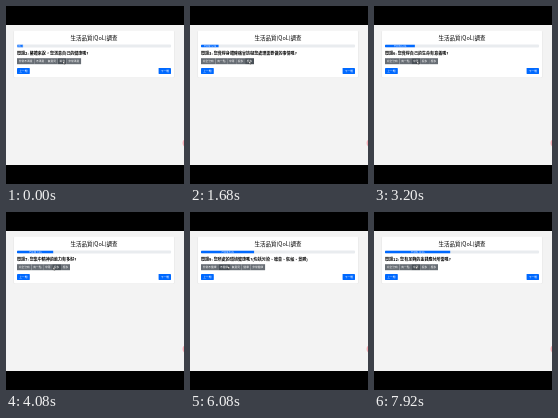
An HTML page with a canvas for the animation above (8000 ms loop, 178x178 px).

```html
<!DOCTYPE html>
<html lang="zh-Hant">
<head>
<meta charset="utf-8">
<title>生活品質調查</title>
<style>
html, body { margin: 0; width: 100%; height: 100%; overflow: hidden; background: #000; }
canvas { display: block; width: 100vw; height: 100vh; }
</style>
</head>
<body>
<canvas></canvas>
<script>
const LOOP = 8000, STAGE = 178, TOTAL = 26;
const BLUE = '#0069ff', GRAY = '#676d74', HOVER = '#495057', INK = '#000';
const FONT = '"Noto Sans CJK TC", "Noto Sans CJK", sans-serif';
const LEFT = 11, RIGHT = 165, BAR_Y = 38.6, BAR_H = 3;

const SATISFIED = ['非常不滿意', '不滿意', '無意見', '滿意', '非常滿意'];
const DEGREE = ['完全沒有', '有一點', '中等', '很多', '極多'];
const HEALTHY = ['非常不健康', '不健康', '無意見', '健康', '非常健康'];

// start time, question, answers; numbering starts at 2
const questions = [
  [-40, '整體來說，您滿意自己的健康嗎?', SATISFIED],
  [960, '您覺得身體疼痛會妨礙您處理需要做的事情嗎?', DEGREE],
  [1760, '您需要靠醫療的幫助應付日常生活嗎?', DEGREE],
  [2480, '您享受生活嗎?', DEGREE],
  [3160, '您覺得自己的生命有意義嗎?', DEGREE],
  [4000, '您集中精神的能力有多好?', DEGREE],
  [4840, '在日常生活中，您感到安全嗎?', DEGREE],
  [5520, '您所處的環境健康嗎?(包括污染、噪音、氣候、景觀)', HEALTHY],
  [6320, '您每天的生活有足夠的精力嗎?', DEGREE],
  [7120, '您能接受自己的外表嗎?', DEGREE],
  [7880, '您有足夠的金錢應付所需嗎?', DEGREE]
];

// time, x, y of the pointer
const pointerPath = [
  [0, 57, 55], [800, 57, 55], [1680, 59, 55], [2480, 42, 55], [3200, 43, 55],
  [3760, 49, 55], [4720, 42, 55], [5040, 42, 55], [6080, 38, 54], [6800, 27, 54], [8000, 42, 54]
];

const canvas = document.querySelector('canvas');
const ctx = canvas.getContext('2d');

function ease(p) {
  if (p >= 1) return 1;
  const bezier = (u, a, b) => 3 * u * (1 - u) ** 2 * a + 3 * u * u * (1 - u) * b + u ** 3;
  let lo = 0, hi = 1;
  for (let i = 0; i < 20; i++) {
    const mid = (lo + hi) / 2;
    if (bezier(mid, .25, .25) < p) lo = mid; else hi = mid;
  }
  return bezier(lo, .1, 1);
}

function box(x, y, w, h, color, radius = 0) {
  ctx.fillStyle = color;
  ctx.beginPath();
  ctx.roundRect(x, y, w, h, radius);
  ctx.fill();
}

function text(str, x, y, size, color, align = 'left', weight = 400) {
  ctx.font = `${weight} ${size}px ${FONT}`;
  ctx.fillStyle = color;
  ctx.textAlign = align;
  ctx.fillText(str, x, y + size * .37);
}

function button(label, x, y, width, color, radius) {
  box(x, y, width, 6, color, radius);
  text(label, x + width / 2, y + 3, 2.77, '#fff', 'center');
}

function drawPage() {
  box(0, 0, STAGE, STAGE, '#000');
  box(0, 19, STAGE, 140, '#f3f3f3');
  box(176.5, 132.5, 9, 9, '#f7b0b8', 4.5);
  box(7.5, 24.4, 161, 47.6, '#e6e6e6', 1.5);
  box(8, 24.4, 160, 47, '#fff', 1);
  text('生活品質(QoL)調查', 88, 31.5, 5.5, INK, 'center', 500);
  button('上一題', LEFT, 62, 12.8, BLUE, .4);
  button('下一題', RIGHT - 12.4, 62, 12.4, BLUE, .4);
}

function drawProgress(number, elapsed) {
  const full = RIGHT - LEFT;
  const width = full * (number - 1 + ease(elapsed / 600)) / TOTAL;
  box(LEFT, BAR_Y, full, BAR_H, '#e9ecef', .8);
  ctx.save();
  ctx.beginPath();
  ctx.roundRect(LEFT, BAR_Y, width, BAR_H, [.8, 0, 0, .8]);
  ctx.clip();
  box(LEFT, BAR_Y, width, BAR_H, BLUE);
  text(`已完成 ${number}/${TOTAL}`, LEFT + width / 2, BAR_Y + BAR_H / 2, 2.37, '#fff', 'center');
  ctx.restore();
}

function drawAnswers(answers, pointerX) {
  let x = LEFT;
  for (const answer of answers) {
    const width = answer.length * 2.77 + 3.4;
    const hovered = pointerX >= x && pointerX < x + width;
    button(answer, x, 52.2, width, hovered ? HOVER : GRAY);
    x += width;
  }
}

function pointerAt(t) {
  const i = pointerPath.findIndex(p => p[0] > t);
  const [t0, x0, y0] = pointerPath[i - 1], [t1, x1, y1] = pointerPath[i];
  const p = (t - t0) / (t1 - t0), s = p * p * (3 - 2 * p);
  return [x0 + (x1 - x0) * s, y0 + (y1 - y0) * s];
}

function drawPointer(x, y) {
  ctx.save();
  ctx.translate(x, y);
  ctx.beginPath();
  [[0, 0], [0, 3], [.7, 2.4], [1.2, 3.5], [1.7, 3.2], [1.2, 2.2], [2.1, 2.1]]
    .forEach(point => ctx.lineTo(...point));
  ctx.closePath();
  ctx.lineWidth = .3;
  ctx.strokeStyle = '#000';
  ctx.fillStyle = '#fff';
  ctx.fill();
  ctx.stroke();
  ctx.restore();
}

function draw(t) {
  const index = questions.findLastIndex(q => q[0] <= t);
  const [start, question, answers] = questions[index];
  const number = index + 2;
  const [x, y] = pointerAt(t);
  drawPage();
  drawProgress(number, t - start);
  text(`問題${number}: ${question}`, LEFT, 47.6, 4.05, INK, 'left', 700);
  drawAnswers(answers, x);
  drawPointer(x, y);
}

function frame() {
  const scale = devicePixelRatio;
  const w = Math.round(innerWidth * scale), h = Math.round(innerHeight * scale);
  if (canvas.width !== w || canvas.height !== h) {
    canvas.width = w;
    canvas.height = h;
  }
  ctx.setTransform(w / STAGE, 0, 0, h / STAGE, 0, 0);
  draw(performance.now() % LOOP);
  requestAnimationFrame(frame);
}
frame();
</script>
</body>
</html>
```
